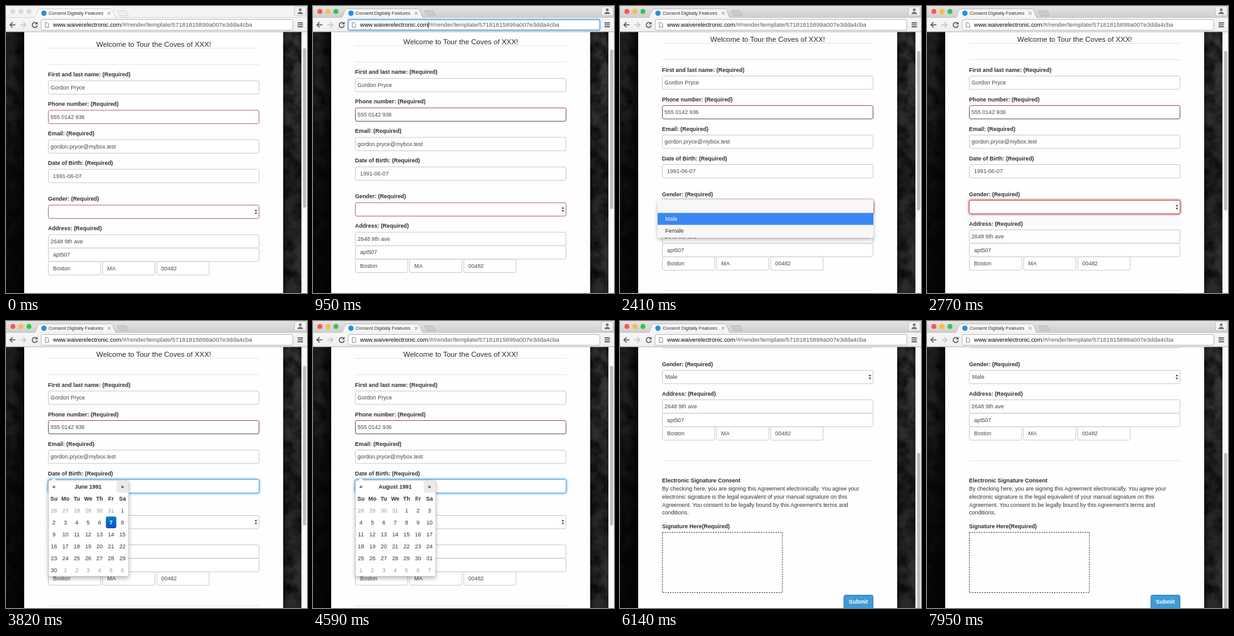
An HTML page that plays this animation: 480 by 457 pixels, repeating every 8000 ms.

```html
<!DOCTYPE html>
<html lang="en">
<head>
<meta charset="utf-8">
<title>Consent form</title>
<style>
  html, body { margin: 0; width: 100%; height: 100%; overflow: hidden; background: #fff; }
  svg { display: block; width: 100%; height: 100%; }
  text { font: 8.93px "Liberation Sans", Arial, sans-serif; fill: #484848; white-space: pre; }
  .b { font-weight: 700; fill: #2e2e2e; }
  .body { fill: #333; }
  .h { font-size: 11.5px; fill: #2b2b2b; }
  .mid { text-anchor: middle; }
  .old { fill: #999; }
  .day { fill: #333; }
  .white { fill: #fff; }
  .tab { font-size: 7.45px; fill: #333; }
  .host { font-size: 9.25px; fill: #000; }
  .path { font-size: 9.65px; fill: #585858; }
  .strip { fill: url(#strip); }
  .plus { fill: #cbcbcb; }
  .idle .strip { fill: #f4f4f4; }
  .idle .front { fill: #fafafa; }
  .idle .plus { fill: #efefef; }
  .idle .light { fill: #dcdcdc; }
  .idle .edge { stroke: #c8c8c8; }
</style>
</head>
<body>
<svg viewBox="0 0 480 457" preserveAspectRatio="none">
  <defs>
    <linearGradient id="left" x2="0" y2="1">
      <stop offset="0" stop-color="#1e1e1e"/><stop offset=".25" stop-color="#202020"/>
      <stop offset=".5" stop-color="#111"/><stop offset="1" stop-color="#060606"/>
    </linearGradient>
    <linearGradient id="right" x2="0" y2="1">
      <stop offset="0" stop-color="#343434"/><stop offset=".25" stop-color="#333"/>
      <stop offset=".55" stop-color="#222"/><stop offset=".85" stop-color="#2e2e2e"/>
      <stop offset="1" stop-color="#2a2a2a"/>
    </linearGradient>
    <linearGradient id="shadeL"><stop offset="0" stop-color="#000" stop-opacity="0"/><stop offset="1" stop-color="#000" stop-opacity=".7"/></linearGradient>
    <linearGradient id="shadeR"><stop offset="0" stop-color="#000" stop-opacity=".35"/><stop offset="1" stop-color="#000" stop-opacity="0"/></linearGradient>
    <linearGradient id="strip" x2="0" y2="1"><stop offset="0" stop-color="#e3e3e3"/><stop offset="1" stop-color="#cfcfcf"/></linearGradient>
    <linearGradient id="bar" x2="0" y2="1"><stop offset="0" stop-color="#f6f6f6"/><stop offset="1" stop-color="#efefef"/></linearGradient>
    <linearGradient id="active" x2="0" y2="1"><stop offset="0" stop-color="#0a80cc"/><stop offset="1" stop-color="#0750c4"/></linearGradient>
    <linearGradient id="error" x2="0" y2="1"><stop offset=".1" stop-color="#b04a4c"/><stop offset=".5" stop-color="#70504f"/><stop offset="1" stop-color="#5a5450"/></linearGradient>
    <filter id="drop" x="-20%" y="-20%" width="140%" height="140%"><feDropShadow dx="0" dy="3" stdDeviation="3" flood-opacity=".28"/></filter>
    <filter id="blur" x="-10%" y="-60%" width="120%" height="220%"><feGaussianBlur stdDeviation="1.6"/></filter>
    <filter id="grain" x="0" y="0" width="100%" height="100%">
      <feTurbulence type="fractalNoise" baseFrequency=".05" numOctaves="4" seed="4"/>
      <feColorMatrix values="0 0 0 0 0  0 0 0 0 0  0 0 0 0 0  1.6 0 0 0 -.55"/>
    </filter>
  </defs>

  <rect x="0" y="41" width="30" height="416" fill="url(#left)"/>
  <rect x="10" y="41" width="19" height="416" fill="url(#shadeL)"/>
  <rect x="441" y="41" width="31" height="416" fill="url(#right)"/>
  <rect x="442" y="41" width="8" height="416" fill="url(#shadeR)"/>
  <rect y="41" width="472" height="416" filter="url(#grain)"/>
  <rect x="29" y="41" width="413" height="416" fill="#fefefe"/>
  <g id="page"></g>

  <rect x="471" y="41" width="9" height="416" fill="#f8f8f8"/>
  <path d="M471.5 41V457" stroke="#dedede"/>
  <rect id="thumb" x="473.6" y="67" width="5.2" height="254" rx="2.6" fill="#bdbdbd"/>

  <g id="chrome">
    <rect class="strip" width="480" height="18"/>
    <rect y="18" width="480" height="23" fill="url(#bar)"/>
    <path class="edge" d="M0 18.3H480" stroke="#b2b2b2" stroke-width=".7"/>
    <path d="M0 41H480" stroke="#b0b0b0"/>
    <path class="front" d="M45 18.8C49 18 49 5 54 4.6H167C172 5 172 18 176 18.8Z" fill="#f6f6f6"/>
    <path class="edge" d="M45 18.3C49 18 49 5 54 4.6H167C172 5 172 18 176 18.3" fill="none" stroke="#acacac" stroke-width=".7"/>
    <path class="plus edge" d="M179 7.5H190Q192 7.5 193 9.5L195 14Q195.5 15.5 194 15.5H183Q181.500 15.5 180.500 13.500L178 9Q177.500 7.500 179 7.500Z" stroke="#b4b4b4" stroke-width=".7"/>
    <circle class="light" cx="11" cy="8.700" r="3.900" fill="#fc5650"/>
    <circle class="light" cx="23.800" cy="8.700" r="3.900" fill="#fdbc3c"/>
    <circle class="light" cx="36.600" cy="8.700" r="3.900" fill="#35c84a"/>
    <circle cx="60.500" cy="11.500" r="4.200" fill="#2a8fd6"/>
    <path d="M162.300 9.300l4.400 4.400m0-4.400l-4.400 4.400" stroke="#777"/>
    <rect x="460" y="1" width="18.500" height="14.500" rx="1.500" fill="#f2f2f2" stroke="#b4b4b4" stroke-width=".7"/>
    <circle cx="469.200" cy="6" r="2.300" fill="#777"/>
    <path d="M464.700 13Q465 9.300 469.200 9.300T473.700 13Z" fill="#777"/>
    <path d="M15 30H6.500M10.500 25.800L6.300 30L10.500 34.200" fill="none" stroke="#555" stroke-width="1.500"/>
    <path d="M23 30H31.500M27.500 25.800L31.700 30L27.500 34.200" fill="none" stroke="#c4c4c4" stroke-width="1.500"/>
    <path d="M48.800 27.600A4 4 0 1 0 49.800 31" fill="none" stroke="#555" stroke-width="1.500"/>
    <path d="M50.300 25v4.200h-4.200Z" fill="#555"/>
    <rect id="address" x="56" y="21.500" width="401.500" height="17" rx="2.500" fill="#fff" stroke="#b8b8b8"/>
    <path d="M62.700 26.300h3.200l2 2v5.700h-5.200Z" fill="#fff" stroke="#777" stroke-width=".9"/>
    <path d="M465 26.800h8.500m-8.500 3.200h8.500m-8.500 3.200h8.500" stroke="#555" stroke-width="1.700"/>
    <path id="caret" d="M184 25.300V35.300" stroke="#111" stroke-width=".9"/>
  </g>
</svg>
<script>
const $ = id => document.getElementById(id);
const LOOP = 8000;
const REST = 7.5; // scroll offset of the form while it is filled in

function add(parent, tag, attrs, str) {
  const el = document.createElementNS('http://www.w3.org/2000/svg', tag);
  for (const k in attrs) el.setAttribute(k, attrs[k]);
  if (str) el.textContent = str;
  parent.appendChild(el);
  return el;
}
const text = (g, x, cy, str, cls = '') => add(g, 'text', { x, y: cy + 3.2, class: cls }, str);
const show = (el, on) => { el.style.display = on ? '' : 'none'; };

const page = $('page');
const GRAY = '#cacaca', RED = '#b5686b', BLUE = '#66afe9';
const field = (x, y, w) =>
  add(page, 'rect', { x, y, width: w, height: 21.3, rx: 2.6, fill: '#fff', stroke: GRAY });
function glow(y, color) {
  return add(page, 'rect', { x: 67.5, y, width: 336, height: 21.3, rx: 3, fill: 'none',
    stroke: color, 'stroke-width': 3, filter: 'url(#blur)' });
}
const rule = y => add(page, 'path', { d: `M67 ${y}H404`, stroke: '#e6e6e6' });

// Form
text(page, 235.5, 61.7, 'Welcome to Tour the Coves of XXX!', 'h mid');
[67, 93, 461].forEach(rule);
[['First and last name', 109], ['Phone number', 156], ['Email', 203],
 ['Date of Birth', 250], ['Gender', 307], ['Address', 354]]
  .forEach(([s, y]) => text(page, 67, y, s + ': (Required)', 'b'));

const dobGlow = glow(260, BLUE);
const errGlow = glow(317, '#c9605f');
const selGlow = glow(317, BLUE);
field(67.5, 119, 336);
const phone = field(67.5, 166, 336);
field(67.5, 213, 336);
const dob = field(67.5, 260, 336);
const gender = field(67.5, 317, 336);
field(67.5, 364, 336);
field(67.5, 385.5, 336);
[67.5, 154, 240.5].forEach(x => field(x, 407, 83.5));

[[71, 129.5, 'Gordon Pryce'], [71, 176.5, '555 0142 936'], [71, 223.5, 'gordon.pryce@mybox.test'],
 [71, 374.5, '2648 9th ave'], [75, 396, 'apt507'], [75, 417.5, 'Boston'],
 [161.5, 417.5, 'MA'], [247.5, 417.5, '00482']]
  .forEach(a => text(page, ...a));
const dobText = text(page, 75, 270.5, '1991-06-07');
const genderText = text(page, 72, 327.5, 'Male');
add(page, 'path', { d: 'M396.500 326.600l2-3.100 2 3.100ZM396.500 328.700l2 3.100 2-3.100Z', fill: '#444' });

// Consent and signature area
text(page, 67, 492.5, 'Electronic Signature Consent', 'b');
['By checking here, you are signing this Agreement electronically. You agree your',
 'electronic signature is the legal equivalent of your manual signature on this',
 "Agreement. You consent to be legally bound by this Agreement's terms and",
 'conditions.'].forEach((s, i) => text(page, 67, 505.3 + i * 12.8, s, 'body'));
text(page, 67, 565.5, 'Signature Here(Required)', 'b');
add(page, 'rect', { x: 67.5, y: 575, width: 191.5, height: 96, fill: 'none', stroke: '#222', 'stroke-dasharray': 1.92 });
add(page, 'rect', { x: 357, y: 675, width: 46.5, height: 21.5, rx: 2.6, fill: '#3f9bd6', stroke: '#2c78b0' });
text(page, 380.2, 685.5, 'Submit', 'b mid white');

// Gender menu
const layer = add(page, 'g', { transform: `translate(0 ${REST})` });
const menu = add(layer, 'g', {});
add(menu, 'rect', { x: 60, y: 308, width: 344, height: 61, rx: 3, fill: '#f7f7f7', filter: 'url(#drop)' });
const pick = add(menu, 'rect', { x: 60, y: 310.5, width: 344, height: 19, fill: '#3a87f2' });
const maleItem = text(menu, 72, 339, 'Male', 'day');
text(menu, 72, 358, 'Female', 'day');

// Date picker
const picker = add(layer, 'g', {});
const col = i => 76.5 + i * 18.2;
const row = i => 301.5 + i * 19.1;
add(picker, 'rect', { x: 67.7, y: 254, width: 128, height: 152.5, rx: 2.6, fill: '#fff', stroke: '#bbb', 'stroke-width': .7, filter: 'url(#drop)' });
add(picker, 'path', { d: 'M71.500 254.500L76.300 249.500L81 254.500Z', fill: '#fff', stroke: '#bbb', 'stroke-width': .6 });
add(picker, 'path', { d: 'M71.500 254.900H81', stroke: '#fff', 'stroke-width': 1.2 });
const hover = add(picker, 'rect', { width: 18.5, height: 18.5, rx: 2, fill: '#eaeaea' });
text(picker, col(0), 264, '«', 'b mid');
text(picker, col(6), 264, '»', 'b mid');
['Su', 'Mo', 'Tu', 'We', 'Th', 'Fr', 'Sa'].forEach((s, i) => text(picker, col(i), 282.5, s, 'b mid'));

const months = ['June', 'July', 'August'].map((name, k) => {
  const g = add(picker, 'g', {}), m = 5 + k;
  const lead = new Date(1991, m, 1).getDay();
  text(g, 131, 264, name + ' 1991', 'b mid');
  for (let i = 0; i < 42; i++) {
    const d = new Date(1991, m, 1 - lead + i), x = col(i % 7), y = row(Math.floor(i / 7));
    const on = m === 5 && d.getMonth() === 5 && d.getDate() === 7;
    if (on) add(g, 'rect', { x: x - 8.2, y: y - 9.3, width: 16.6, height: 18.6, rx: 2.4, fill: 'url(#active)' });
    text(g, x, y, String(d.getDate()), 'mid ' + (on ? 'b white' : d.getMonth() === m ? 'day' : 'old'));
  }
  return g;
});

// Browser labels
const chrome = $('chrome');
text(chrome, 68, 11.2, 'Consent Digitally Features', 'tab');
text(chrome, 75, 30, 'www.waiverelectronic.com', 'host');
text(chrome, 184, 30, '/#/render/template/57181815899a007e3dda4cba', 'path');

const scrolls = [[0, 0], [650, 0], [1250, REST], [5460, REST], [5590, 238.5], [LOOP, 238.5]];
const hovers = [[3700, col(6), 264], [4640, col(5), row(0)], [4680, col(5), row(2)]];

function ease(steps, t) {
  const i = Math.max(1, steps.findIndex(s => s[0] > t));
  const [t0, a] = steps[i - 1], [t1, b] = steps[i];
  const k = (t - t0) / (t1 - t0);
  return a + (b - a) * k * k * (3 - 2 * k);
}
const within = (t, a, b) => t >= a && t < b;

function draw(t) {
  const s = ease(scrolls, t);
  page.setAttribute('transform', `translate(0 ${-s})`);
  $('thumb').setAttribute('y', 67 + s * .6);

  // The window comes to the front when the address bar is clicked
  const front = t >= 900, typing = front && t < 2050;
  chrome.setAttribute('class', front ? '' : 'idle');
  $('address').setAttribute('stroke', typing ? '#6ea8e4' : '#b8b8b8');
  $('address').setAttribute('stroke-width', typing ? 1.8 : 1);
  show($('caret'), typing);
  phone.setAttribute('stroke', front ? 'url(#error)' : RED);

  const chosen = t >= 2800;
  show(errGlow, within(t, 2100, 2800));
  show(selGlow, within(t, 2800, 3300));
  gender.setAttribute('stroke', !chosen ? RED : t < 3300 ? BLUE : GRAY);
  show(genderText, chosen);
  show(menu, within(t, 2100, 2800));
  menu.setAttribute('opacity', Math.pow(1 - Math.max(0, (t - 2560) / 240), 2));
  const onMale = t >= 2360;
  pick.setAttribute('y', onMale ? 329.5 : 310.5);
  maleItem.setAttribute('class', onMale ? 'white' : 'day');

  const dating = within(t, 3300, 4900);
  show(picker, dating);
  show(dobGlow, dating);
  dob.setAttribute('stroke', dating ? BLUE : GRAY);
  dobText.textContent = t < 4900 ? '1991-06-07' : '1991-08-16';
  const m = t < 4100 ? 0 : t < 4400 ? 1 : 2;
  months.forEach((g, i) => show(g, i === m));
  const h = hovers.filter(p => p[0] <= t).pop();
  show(hover, h);
  if (h) {
    hover.setAttribute('x', h[1] - 9.2);
    hover.setAttribute('y', h[2] - 9.3);
  }
}

const start = performance.now();
function tick(now) {
  draw(Math.max(0, now - start) % LOOP);
  requestAnimationFrame(tick);
}
draw(0);
requestAnimationFrame(tick);
</script>
</body>
</html>
```
